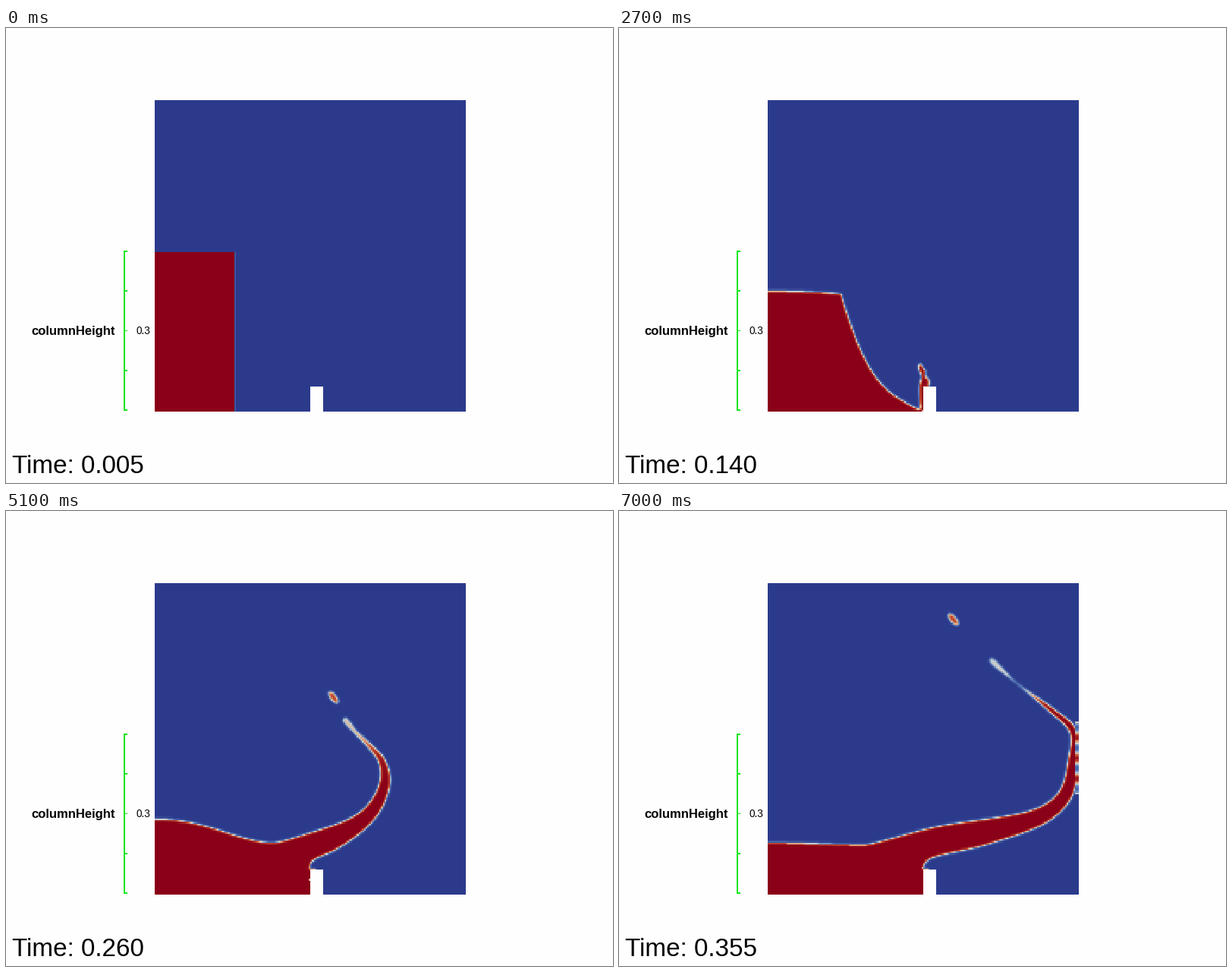
Write a matplotlib script that moves like this. It is 800x599 px and loops after 7.1 s.

```python
import numpy as np
import matplotlib.pyplot as plt
from matplotlib.animation import FuncAnimation
from matplotlib.colors import LinearSegmentedColormap
from matplotlib.patches import Rectangle

W, H, DPI = 800, 599, 64
FRAMES, STEP = 71, 100
LEFT, RIGHT, TOP, FLOOR = 196, 606, 94.6, 504.6
N, SUB = 180, 4                      # cells per side, sample rows per cell
CELL = (RIGHT - LEFT) / N
EDGE = 301                           # right side of the resting column
CORNER = np.array([400, 471])        # upper left corner of the step
IMPACT, LAUNCH = 24, 35              # front hits the step, jet stands upright
PAPER, GREEN = "#fefefe", "#14e61e"

PHASE = LinearSegmentedColormap.from_list("phase", [
    (0, "#2c3a8c"), (0.25, "#5b80bd"), (0.5, "#c9cfd0"),
    (0.68, "#e0a882"), (0.84, "#c2492f"), (1, "#8a0018")])

# Parcels along the jet, root to tip: x, y, vx, vy at launch, final width.
PARCELS = np.array([
    (407, 444, 3.10, -2.86, 23), (412, 428, 4.45, -3.38, 18),
    (410, 408, 5.50, -4.25, 14), (410, 397, 5.30, -5.24, 9.5),
    (409, 392, 4.55, -6.09, 6.5), (409, 387, 3.28, -7.14, 5),
    (409, 383, 2.30, -8.10, 5)])


def smooth(t):
    t = np.clip(t, 0, 1)
    return t * t * (3 - 2 * t)


def spline(pts, per=8):
    """Smooth curve through the points, paced by root chord length."""
    gaps = np.hypot(*np.diff(pts, axis=0).T)
    s = np.concatenate([[0], np.cumsum(np.sqrt(gaps + 1e-3))])
    m = np.gradient(pts, s, axis=0)
    u = np.linspace(0, 1, per, endpoint=False)[:, None]
    parts = []
    for a, b, ma, mb, h in zip(pts, pts[1:], m, m[1:], np.diff(s)):
        parts.append(a + (b - a) * smooth(u)
                     + h * u * (1 - u) * (ma * (1 - u) - mb * u))
    return np.vstack(parts + [pts[-1:]])


def coverage(poly):
    """Share of every grid cell that lies inside the polygon."""
    p = (poly - np.array([LEFT, TOP])) / CELL
    x0, y0 = p.T
    x1, y1 = np.roll(p, -1, axis=0).T
    ys = (np.arange(N * SUB) + 0.5) / SUB
    r, e = np.nonzero((y0 <= ys[:, None]) != (y1 <= ys[:, None]))
    x = x0[e] + (ys[r] - y0[e]) / (y1[e] - y0[e]) * (x1[e] - x0[e])
    sign = np.where(y1[e] > y0[e], 1, -1)[:, None]
    share = sign * np.clip(np.arange(N) + 1 - x[:, None], 0, 1) / SUB
    out = np.zeros((N, N))
    np.add.at(out, r // SUB, share)
    return np.clip(np.abs(out), 0, 1)


def wall_level(n):
    return FLOOR - 209.6 / (1 + (n / 48.3) ** 1.96)


def column(n):
    """Collapsing block: flat top, then a front that runs out to a toe."""
    u, v = np.linspace(0, 1, 16), np.linspace(0, 1, 25)[1:]
    level = wall_level(n)
    shoulder = level + 0.16 * n
    toe = min(EDGE + 0.96 * n ** 1.46, CORNER[0])
    top = np.column_stack([LEFT + (EDGE - LEFT) * u,
                           level + (shoulder - level) * u ** 2])
    run = 0.35 * v ** 1.8 + 0.65 * v ** 5.5
    front = np.column_stack([EDGE + (toe - EDGE) * run,
                             shoulder + (FLOOR - shoulder) * v])
    return np.vstack([top, front])


def wave(d):
    """Surface from the left wall down to the trough before the jet."""
    u = np.linspace(0, 1, 40)
    level = wall_level(d + LAUNCH)
    trough = min(432 + 0.2 * d + 17 * np.exp(-d / 6), 492)
    bend = 1 + 0.8 * np.exp(-d / 12)
    return np.column_stack([LEFT + (376 - 1.45 * d - LEFT) * u,
                            level + (trough - level) * smooth(u ** bend)])


def drift(d):
    """Sideways travel is slow while the jet still climbs the step."""
    return max(d, 0.3 * d)


def jet(d):
    """Left side, right side and tip of the thrown sheet."""
    x, y, vx, vy, width = PARCELS.T
    s = np.linspace(0, 1, len(PARCELS))
    t = drift(d)
    x = np.minimum(x + vx * t + 0.036 * (1 - s) ** 4 * t * t, RIGHT - 7)
    y = y + vy * d + (0.045 + 0.033 * s) * d * d
    width = width * (1 - 0.4 * np.exp(-max(d, 0) / 5)) * min(1, 1 + d / 16)
    width[-2] *= 1 - 0.85 * (max(d, 0) / 35) ** 3
    mid = np.column_stack([x, y])
    way = np.gradient(mid, axis=0)
    way /= np.hypot(*way.T)[:, None] + 1e-9
    side = np.column_stack([way[:, 1], -way[:, 0]]) * width[:, None] / 2
    return mid + side, mid - side, mid[-1]


def splashed(n):
    d = n - LAUNCH
    w = smooth((n - IMPACT + 1) / 12)
    surf = (1 - w) * column(n) + w * wave(d)
    inner, outer, tip = jet(d)
    rise = surf[-1] + 0.4 * (inner[0] - surf[-1]) + (0, 8 - 0.34 * abs(d))
    under = (outer[0] + CORNER) / 2
    foot = CORNER + (0.04, 0.18) * (outer[0] - CORNER)
    edge = spline(np.vstack([surf[-4], surf[-1], rise, inner, outer[::-1],
                             under, foot, CORNER]))
    poly = np.vstack([surf[:-4], edge, [(408, CORNER[1]), (408, FLOOR),
                                        (LEFT, FLOOR)]])
    return poly, tip


def drop(d):
    """Outline of the drop thrown off the tip."""
    t, age = drift(d), max(d, 0)
    x = 410 + 1.75 * t - 0.025 * t * t
    y = 381 - 9.9 * d + 0.088 * d * d
    long = 9.5 - 4 * np.exp(-age / 5)
    tilt = np.radians(50 + 35 * np.exp(-age / 5))
    ang = np.linspace(0, 2 * np.pi, 40, endpoint=False)
    u, v = long * np.cos(ang), 4 * np.sin(ang)
    return np.column_stack([x + u * np.cos(tilt) - v * np.sin(tilt),
                            y + u * np.sin(tilt) + v * np.cos(tilt)])


def soften(a, k):
    for _ in range(2):
        p = np.pad(a, ((1, 1), (0, 0)), mode="edge")
        a = ((1 - 2 * k) * a + k * (p[:-2] + p[2:])).T
    return a


CX = LEFT + (np.arange(N) + 0.5) * CELL
CY = (TOP + (np.arange(N) + 0.5) * CELL)[:, None]


def fraction(n):
    """Share of water in every cell at step n."""
    blur = 0.14 * min(n / 12, 1)
    if n < IMPACT:
        return soften(coverage(np.vstack([column(n), [(LEFT, FLOOR)]])), blur)
    d = n - LAUNCH
    poly, (tx, ty) = splashed(n)
    thin = 0.5 * (1 - np.exp(-max(d, 0) / 10))
    near = np.exp(-((CX - tx) ** 2 + (CY - ty) ** 2) / 50 ** 2)
    a = coverage(poly) * (1 - thin * near)
    a = soften(np.clip(a + 0.85 * coverage(drop(d)), 0, 1), blur)
    # Film and air pockets where the jet strikes the right wall.
    wet = np.abs(CY[:, 0] - 325) < 12 * (n - 66)
    a[wet, -2:] = 0.55 + 0.4 * np.cos(2 * np.pi * (CY[wet] - 325) / 27)
    # Air bubble climbing the step.
    row = int((500 - 0.88 * d - TOP) / CELL)
    a[min(row, N - 1), int((399 - LEFT) / CELL)] = 0.65
    return a


fig = plt.figure(figsize=(W / DPI, H / DPI), dpi=DPI, facecolor=PAPER)
ax = fig.add_axes([0, 0, 1, 1])
ax.axis("off")


def label(x, y, text, px, **kw):
    return ax.text(x, y, text, fontsize=px * 72 / DPI, color="black",
                   family="Liberation Sans", va="baseline", **kw)


def block(x, y, w, h, color):
    ax.add_patch(Rectangle((x, y), w, h, color=color, lw=0))


field = ax.imshow(np.zeros((N, N)), cmap=PHASE, vmin=0, vmax=1,
                  extent=(LEFT, RIGHT, FLOOR, TOP), interpolation="nearest",
                  aspect="auto")
block(400.5, 471.5, 17, 35, PAPER)

block(155.2, 293.5, 1.8, 210, GREEN)
for tick in np.linspace(294, 503, 5):
    block(155.2, tick - 0.8, 4.6, 1.6, GREEN)

label(33.5, 404, "columnHeight", 16.6, weight="bold")
label(171, 403, "0.3", 13.6)
clock = label(8.5, 586, "", 33.2)

ax.set_xlim(0, W)
ax.set_ylim(H, 0)


def update(n):
    field.set_data(fraction(n))
    clock.set_text(f"Time: {0.005 * (n + 1):.3f}")
    return field, clock


anim = FuncAnimation(fig, update, frames=FRAMES, interval=STEP,
                     init_func=lambda: update(0), repeat=True, repeat_delay=0)
plt.show()
```
